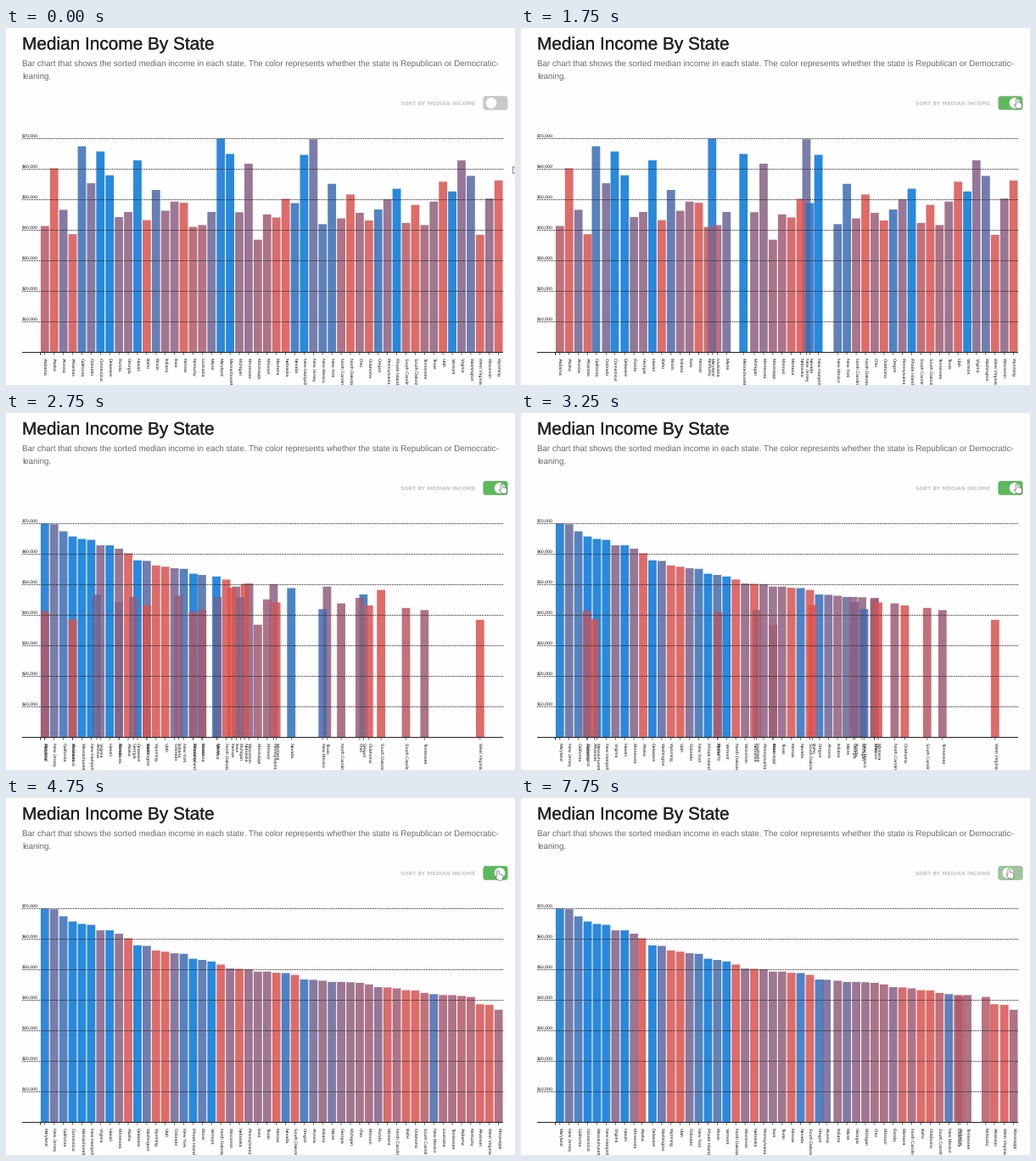
Write a matplotlib script that moves like this. It is 600 px wide and 421 px high and loops after 8 s.

```python
import numpy as np
import matplotlib.pyplot as plt
import matplotlib.patheffects as pe
from matplotlib.animation import FuncAnimation
from matplotlib.colors import to_rgb
from matplotlib.patches import Circle, FancyBboxPatch, Polygon, Rectangle

W, H, DPI = 600, 421, 100
STEP_MS, FRAMES = 250, 32
SORT_AT, UNSORT_AT = 1508, 7588
MOVE_MS, STAGGER_MS = 750, 34.5

LEFT, RIGHT, BASE, PX_PER_K = 40.5, 586, 382.5, 3.6
FIRST, PITCH, BAR_W = 45.8, 10.915, 9.8
RED, BLUE, GREEN, GREY = (np.array(to_rgb(c)) for c in
                          ("#d9534f", "#0275d8", "#5cb85c", "#c8c8c8"))

# State, median income in thousands, lean (0 red to 1 blue), highest income first
STATES = [
    ("Maryland", 70.0, .95), ("New Jersey", 69.8, .56), ("California", 67.5, .75),
    ("Connecticut", 65.8, 1), ("Massachusetts", 65.0, 1), ("New Hampshire", 64.7, 1),
    ("Virginia", 62.9, .4), ("Hawaii", 62.9, 1), ("Minnesota", 61.8, .38),
    ("Alaska", 60.3, 0), ("Delaware", 58.0, 1), ("Washington", 57.8, .6),
    ("Wyoming", 56.3, 0), ("Utah", 55.9, 0), ("Colorado", 55.4, .48),
    ("New York", 55.2, .74), ("Rhode Island", 53.6, 1), ("Illinois", 53.2, .66),
    ("Vermont", 52.7, 1), ("North Dakota", 51.7, 0), ("Wisconsin", 50.4, .37),
    ("Nebraska", 50.3, 0), ("Pennsylvania", 50.2, .36), ("Iowa", 49.4, .35),
    ("Texas", 49.4, .34), ("Kansas", 49.0, 0), ("Nevada", 48.9, .8),
    ("South Dakota", 48.3, 0), ("Oregon", 46.8, .78), ("Arizona", 46.7, .5),
    ("Indiana", 46.4, .33), ("Maine", 46.0, .52), ("Georgia", 46.0, .36),
    ("Michigan", 45.9, .34), ("Ohio", 45.7, .3), ("Missouri", 45.2, .27),
    ("Florida", 44.3, .4), ("Montana", 44.2, .05), ("North Carolina", 43.9, .27),
    ("Idaho", 43.3, 0), ("Oklahoma", 43.2, 0), ("South Carolina", 42.4, .15),
    ("New Mexico", 42.0, .68), ("Louisiana", 41.7, .23), ("Tennessee", 41.7, .27),
    ("Alabama", 41.4, .17), ("Kentucky", 41.1, .18), ("Arkansas", 38.7, .02),
    ("West Virginia", 38.5, 0), ("Mississippi", 36.9, .27),
]
NAMES = [s[0] for s in STATES]
BY_INCOME = np.arange(len(STATES))
BY_NAME = np.array([sorted(NAMES).index(n) for n in NAMES])

# Pointer path: time, x, y of the tip
PATH = np.array([(0, 597.6, 163), (250, 597.6, 163), (1250, 584, 83.5),
                 (4000, 584, 83.5), (5250, 576.3, 87), (6250, 576.3, 87),
                 (7250, 574.5, 83.5)])
ARROW = np.array([(0, 0), (0, 9), (2.2, 7.2), (3.6, 10), (4.8, 9.4),
                  (3.5, 6.7), (6.3, 6.4)])
HAND = np.array([(0, 0), (1.2, 0), (1.8, .8), (1.8, 4), (5, 4.8), (6.5, 6),
                 (6.5, 8.5), (5.5, 11.5), (.5, 11.5), (-2.5, 7.5),
                 (-2.2, 6.5), (-.6, 7), (-.6, .8)])

plt.rcParams.update({"font.family": "Liberation Sans", "text.hinting": "none"})
fig = plt.figure(figsize=(W / DPI, H / DPI), dpi=DPI, facecolor="#fefefe")
ax = fig.add_axes([0, 0, 1, 1])
ax.set(xlim=(0, W), ylim=(H, 0))
ax.axis("off")


def pt(px):
    return px * 72 / DPI


def mix(a, b, k):
    return a + (b - a) * k


def text(x, y, s, size, color, **kw):
    return ax.text(x, y, s, fontsize=pt(size), color=color, **kw)


def line(x, y, **kw):
    style = dict(color="#222222", lw=pt(1), zorder=3, snap=False,
                 solid_capstyle="butt")
    return ax.plot(x, y, **{**style, **kw})[0]


def ease(t):
    t = np.clip(t, 0, 1)
    return np.where(t < .5, 4 * t ** 3, 1 - 4 * (1 - t) ** 3)


# Headings
title = text(19, 25.3, "Median Income By State", 20.8, "#222222")
title.set_path_effects([pe.withStroke(linewidth=pt(.25), foreground="#222222")])
text(19, 45, "Bar chart that shows the sorted median income in each state. "
     "The color represents whether the state is Republican or Democratic-",
     9.76, "#6a6a6a")
text(19, 60, "leaning.", 9.76, "#6a6a6a")
text(465, 90.7, "SORT BY MEDIAN INCOME", 6.13, "#c6c6c6",
     family="DejaVu Sans", weight="bold")

# Axes
for k in range(10, 71, 10):
    y = BASE - k * PX_PER_K
    line([19, RIGHT], [y, y], linestyle=(0, (1, 1)))
    text(19.3, y - 1.6, f"${k},000", 5.3, "#111111")
line([19, RIGHT], [BASE, BASE])
line([LEFT, LEFT], [BASE, BASE + 3])

# Bars with their ticks and labels
bars, ticks, labels = [], [], []
for name, income, lean in STATES:
    h = income * PX_PER_K
    bars.append(ax.add_patch(Rectangle((0, BASE - h), BAR_W, h, lw=0, alpha=.85,
                                       color=mix(RED, BLUE, lean), snap=False)))
    ticks.append(line([0, 0], [BASE, BASE + 3], lw=pt(.7)))
    labels.append(text(0, 389, name, 5.3, "#111111", rotation=270,
                       rotation_mode="anchor", ha="left", va="baseline"))

# Switch and pointer
switch = ax.add_patch(FancyBboxPatch((562.9, 80.7), 28.1, 15.5, lw=pt(1),
                                     boxstyle="round,pad=0,rounding_size=2.5"))
knob = ax.add_patch(Circle((572, 88.5), 6.3, fc="white", lw=0, zorder=4))
pointer = ax.add_patch(Polygon(HAND, fc="white", ec="#666666", lw=pt(.7),
                               zorder=5))


def slots(ms):
    if ms < UNSORT_AT:
        start, old, new = SORT_AT, BY_NAME, BY_INCOME
    else:
        start, old, new = UNSORT_AT, BY_INCOME, BY_NAME
    return mix(old, new, ease((ms - start - new * STAGGER_MS) / MOVE_MS))


def switched(ms, duration):
    """How far the switch is on, from 0 to 1."""
    on = np.clip((ms - SORT_AT) / duration, 0, 1)
    off = np.clip((ms - UNSORT_AT) / duration, 0, 1)
    return on - off


def draw(i):
    ms = i * STEP_MS
    for x, bar, tick, label in zip(FIRST + PITCH * slots(ms), bars, ticks, labels):
        bar.set_x(x - BAR_W / 2)
        tick.set_xdata([x, x])
        label.set_x(x - 1.3)
    switch.set_facecolor(mix(GREY, GREEN, switched(ms, 250)))
    switch.set_edgecolor(mix(GREY, GREEN, switched(ms, 400)))
    knob.set_center((mix(572, 582, switched(ms, 200)), 88.5))
    tip = np.array([np.interp(ms, PATH[:, 0], PATH[:, c]) for c in (1, 2)])
    over = 563 < tip[0] < 591 and 81 < tip[1] < 97
    pointer.set_xy((HAND if over else ARROW) + tip)


anim = FuncAnimation(fig, draw, frames=FRAMES, init_func=lambda: draw(0),
                     interval=STEP_MS, repeat=True, repeat_delay=0)
plt.show()
```
